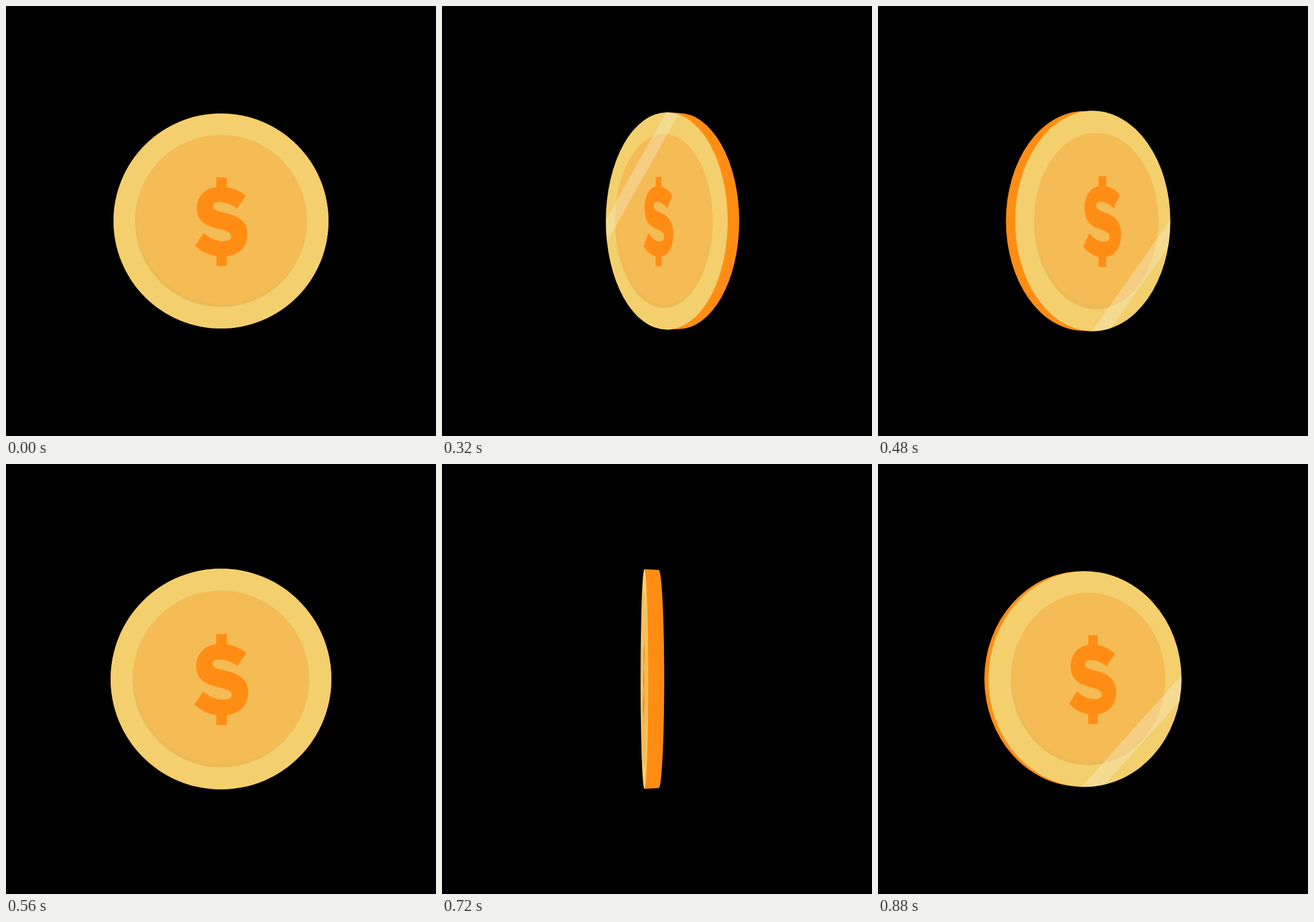
Write an HTML page with a canvas that moves like this. It is 748 by 748 pixels and loops after 0.96 s.

```html
<!DOCTYPE html>
<html>
<head>
<meta charset="utf-8">
<title>Spinning coin</title>
<style>
  html, body { margin: 0; height: 100%; overflow: hidden; background: #000; }
  canvas { display: block; }
</style>
</head>
<body>
<canvas id="stage" width="748" height="748"></canvas>
<script>
const ctx = document.getElementById('stage').getContext('2d');
const MID = 374, STEP = 80, STEPS = 12, TURN = 7;
const RIM = '#f3cf6d', DISC = '#f5bb55', SHADE = '#eabb57', ORANGE = '#ff8d13';
const SHINE = 'rgba(246,236,200,.4)';

// Poses by distance from the half turn; the first half of the spin mirrors them.
// [face x, face rx, ry, edge depth, edge rx, disc shift, dollar shift]
const POSES = [
  [0, 192, 192, 0, 192, 0, 0],
  [0.5, 135, 191.7, 16, 135, -6, -16],
  [-22, 6.5, 191, 25, 9.5, -0.5, -1.5],
  [-17, 106, 189, -20, 106, 5, 15],
  [-14, 168, 187.5, -7, 168, 5.5, 13],
  [-4.5, 185.5, 187, 0, 185.5, 1.5, 3.5],
  [0, 187, 187, 0, 187, 0, 0]
];
// Diagonal position of the light band for each step; 2 is off the coin.
const BAND = [2, 2, -1.31, -1.17, -0.9, 0.1, 1.1, 2, -1.12, -0.6, 0.4, 1.075];

const dollar = new Path2D(
  'M366 298H384V315C396 317 408 322 417 330L402 352C392 345 381 341 371 341' +
  'C363 341 360 344 360 348C360 354 365 356 382 360C407 366 420 376 420 397' +
  'C420 419 405 433 384 435V452H366V435C352 433 339 427 329 417L344 395' +
  'C354 404 366 409 378 409C387 409 392 406 392 401C392 395 387 392 370 388' +
  'C345 382 332 373 332 352C332 332 346 317 366 315Z');

function oval(x, y, rx, ry, color) {
  ctx.beginPath();
  ctx.ellipse(x, y, rx, ry, 0, 0, Math.PI * 2);
  ctx.fillStyle = color;
  ctx.fill();
}

function drawEdge(x, ry, depth, rx) {
  const back = ry - Math.abs(depth) / 20;
  oval(x + depth, 0, rx, back, ORANGE);
  ctx.beginPath();
  ctx.moveTo(x, -ry);
  ctx.lineTo(x + depth, -back);
  ctx.lineTo(x + depth, back);
  ctx.lineTo(x, ry);
  ctx.fill();
}

function drawDisc(x, rx, ry) {
  ctx.save();
  oval(x, 0, rx, ry, SHADE);
  ctx.clip();
  oval(x + rx * 0.015, -ry * 0.035, rx, ry, DISC);
  ctx.restore();
}

function drawDollar(x, sx, sy) {
  ctx.save();
  ctx.translate(x + 0.5, 0.5);
  ctx.scale(sx, sy);
  ctx.translate(-374.5, -374.5);
  ctx.fillStyle = ORANGE;
  ctx.fill(dollar);
  ctx.restore();
}

function drawShine(x, rx, ry, at) {
  const from = at - 0.11, to = at + 0.11;
  ctx.save();
  ctx.translate(x, 0);
  ctx.scale(rx, ry);
  ctx.beginPath();
  ctx.arc(0, 0, 1, 0, Math.PI * 2);
  ctx.clip();
  ctx.beginPath();
  ctx.moveTo(from + 2, -2);
  ctx.lineTo(to + 2, -2);
  ctx.lineTo(to - 2, 2);
  ctx.lineTo(from - 2, 2);
  ctx.fillStyle = SHINE;
  ctx.fill();
  ctx.restore();
}

function draw() {
  const step = Math.floor(performance.now() / STEP) % STEPS;
  const pose = POSES[Math.min(Math.abs(step - TURN), POSES.length - 1)];
  const side = step < TURN ? -1 : 1;
  const [faceX, rx, ry, depth, edgeRx, discShift, dollarShift] = pose;
  const x = faceX * side;

  ctx.setTransform(1, 0, 0, 1, 0, 0);
  ctx.fillStyle = '#000';
  ctx.fillRect(0, 0, 748, 748);
  ctx.translate(MID, MID);
  drawEdge(x, ry, depth * side, edgeRx);
  oval(x, 0, rx, ry, RIM);
  drawDisc(x + discShift * side, rx * 0.8, ry * 0.8);
  drawDollar(x + dollarShift * side, rx / 187, ry / 187);
  drawShine(x, rx, ry, BAND[step]);
  requestAnimationFrame(draw);
}
draw();
</script>
</body>
</html>
```
